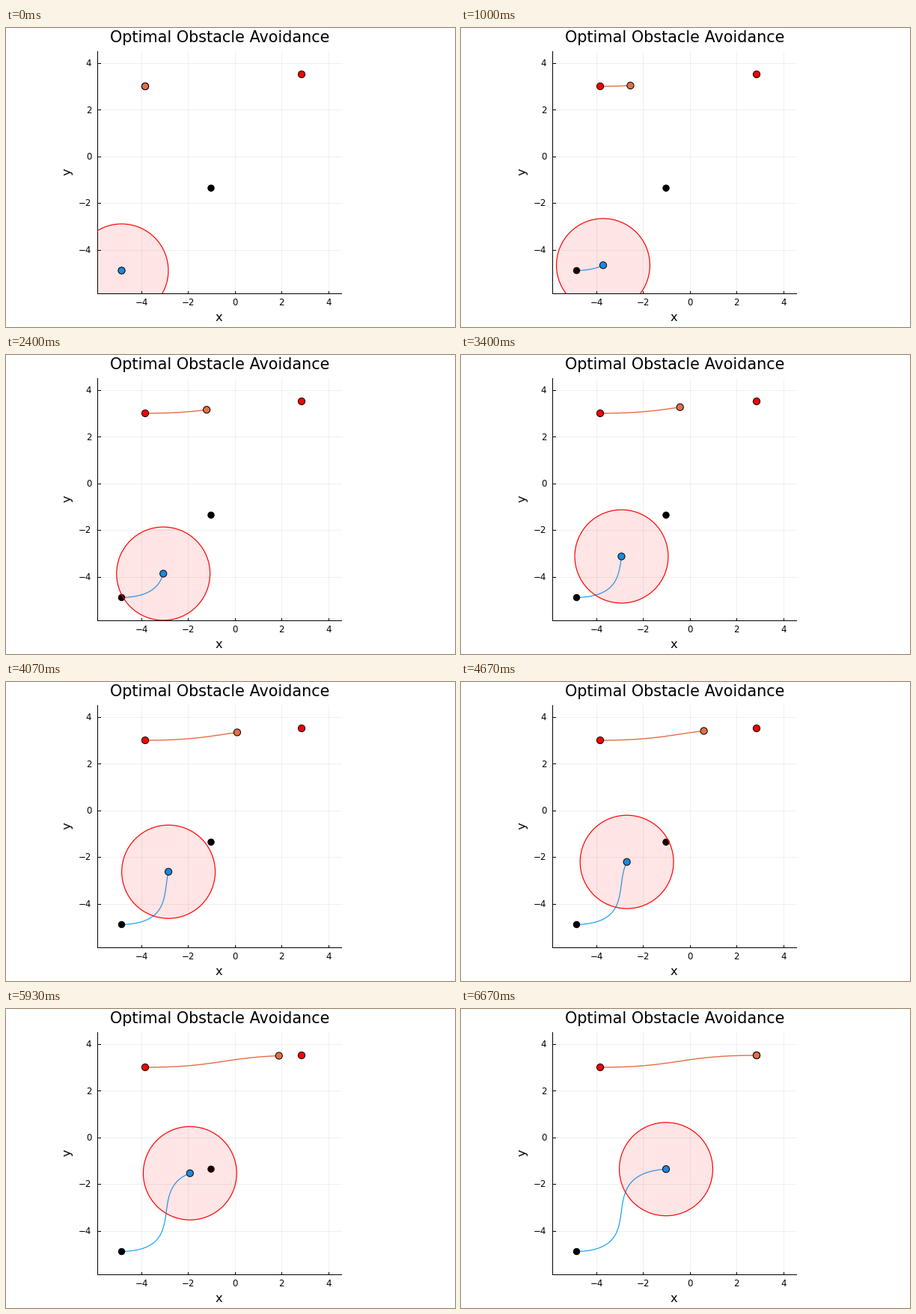
Recreate the animation shown at these times as a matplotlib script. Size 600x400 px, loop 6740 ms.

```python
import numpy as np
import matplotlib.pyplot as plt
from matplotlib.animation import FuncAnimation
from matplotlib.patches import Circle, Rectangle

LOOP_MS, TICK_MS, FPS = 6740, 20, 15
STEPS = 101  # poses along each path
LEFT, RIGHT, TOP, BOTTOM = 122.2, 447.5, 30.5, 355.2
X0, Y0, UNIT = 305.9, 171.8, 31.22
PX = 0.72  # points per pixel at 100 dpi
BLUE, ORANGE = "#009afa", "#e36f47"

plt.rcParams["font.family"] = "DejaVu Sans"
fig = plt.figure(figsize=(6, 4), dpi=100, facecolor="white")
ax = fig.add_axes([0, 0, 1, 1])
ax.set(xlim=(0, 600), ylim=(400, 0))
ax.axis("off")


def glide(start, end, slope, bulge=0):
    """Cubic from start to end with a given speed at the halfway point."""
    u = np.linspace(-1, 1, STEPS)
    mid, half = (start + end) / 2, (end - start) / 2
    return mid + half * u**3 + slope * (u - u**3) + bulge * (1 - u**2)


def segment(xs, ys, width=1.0, color="black", **kw):
    return ax.plot(xs, ys, color=color, lw=width * PX, **kw)[0]


def marker(pos, color, z, radius=4.6):
    dot = Circle(pos, radius, fc=color, ec="black", lw=PX, zorder=z)
    return ax.add_patch(dot)


def label(x, y, text, size, ha="center", va="baseline", **kw):
    ax.text(x, y, text, fontsize=size * PX, ha=ha, va=va, **kw)


blue = np.column_stack([glide(154.5, 274, 10.6),
                        glide(324.5, 214.2, -79, 1.7)])
orange = np.column_stack([glide(186, 395, 80, 0.6),
                          glide(78, 62, -12)])

# Grid, ticks and axes
for v in range(-4, 5, 2):
    x, y = X0 + UNIT * v, Y0 - UNIT * v
    segment([x, x], [TOP, BOTTOM], alpha=0.06, zorder=0)
    segment([LEFT, RIGHT], [y, y], alpha=0.06, zorder=0)
    segment([x, x], [BOTTOM, BOTTOM - 3.5], zorder=1)
    segment([LEFT, LEFT + 3.5], [y, y], zorder=1)
    name = str(v).replace("-", "\u2212")
    label(x, 371.2, name, 11.8)
    label(114.3, y + 4.2, name, 11.8, ha="right")
segment([LEFT, LEFT], [TOP, BOTTOM], zorder=1)
segment([LEFT, RIGHT], [BOTTOM, BOTTOM], zorder=1)

label(285.3, 18.7, "Optimal Obstacle Avoidance", 20.77)
label(284.6, 391.8, "x", 16.3)
label(81.8, 192.5, "y", 16.3, va="center", rotation=90)

# Paths, end points, agents and safety zone
tracks = []
for path, color, ends, radius, width in ((blue, BLUE, "black", 4.2, 1.1),
                                         (orange, ORANGE, "red", 4.6, 1.4)):
    line = segment([], [], width, color, zorder=2)
    marker(path[0], ends, 3, radius)
    marker(path[-1], ends, 3, radius)
    tracks.append((path, line, marker(path[0], color, 4)))

zone = Circle(blue[0], 2 * UNIT, fc=(1, 0, 0, 0.1), ec="red",
              lw=1.2 * PX, zorder=5)
ax.add_patch(zone)
zone.set_clip_path(Rectangle((LEFT, TOP), RIGHT - LEFT, BOTTOM - TOP,
                             transform=ax.transData))


def draw(tick):
    ms = tick * TICK_MS + 15
    k = min(ms * FPS // 1000, STEPS - 1)
    for path, line, dot in tracks:
        line.set_data(path[:k + 1, 0], path[:k + 1, 1])
        dot.center = path[k]
    zone.center = blue[k]
    return []


anim = FuncAnimation(fig, draw, frames=LOOP_MS // TICK_MS, interval=TICK_MS,
                     init_func=lambda: draw(0), repeat=True, repeat_delay=0)
plt.show()
```
